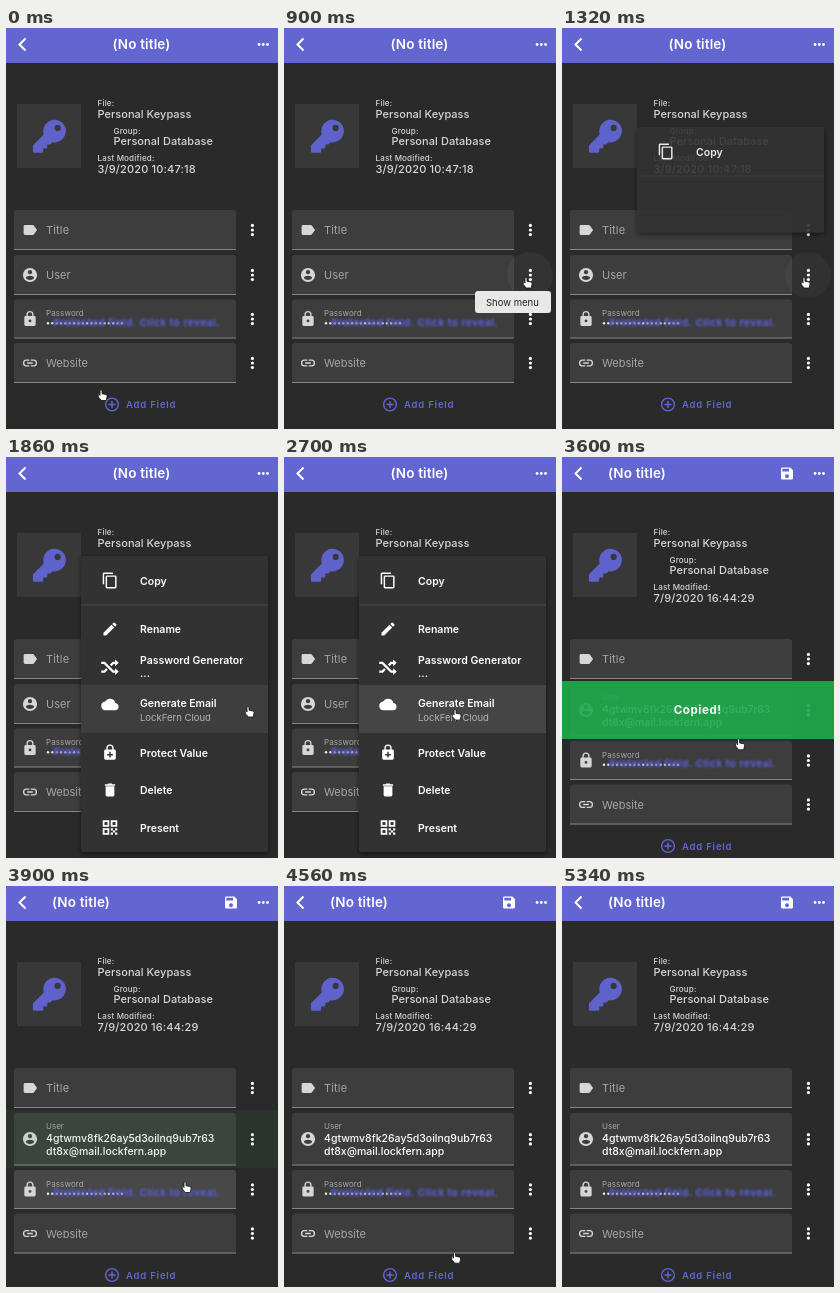
Recreate the animation shown at these times as an HTML page. Size 272 px wide and 401 px high, loop 5400 ms.

```html
<!DOCTYPE html>
<html lang="en">
<head>
<meta charset="utf-8">
<title>Generate email</title>
<style>
  html, body { margin: 0; width: 100%; height: 100%; overflow: hidden; background: #2a2a2a; }
  svg { display: block; width: 272px; height: 401px; font-family: Inter, Roboto, sans-serif; }
  text { white-space: pre; }
</style>
</head>
<body>
<svg id="stage" viewBox="0 0 272 401" width="272" height="401"></svg>
<script>
const LOOP = 5400, STEP = 60, GROW = 12.5;
const BLUE = '#6366d1', LIGHT = '#d6d6d6', GREY = '#a6a6a6';

// 24-unit icon outlines
const ICON = {
  label: 'M17.63 5.84C17.27 5.33 16.67 5 16 5L5 5C3.9 5 3 5.9 3 7v10c0 1.1.9 2 2 2h11c.67 0 1.27-.33 1.63-.84L22 12z',
  user: 'M12 2a10 10 0 1 0 0 20a10 10 0 0 0 0-20zm0 3a3 3 0 1 1 0 6a3 3 0 0 1 0-6zm0 14.2c-2.5 0-4.71-1.28-6-3.22c.03-1.99 4-3.08 6-3.08s5.97 1.09 6 3.08c-1.29 1.94-3.5 3.22-6 3.22z',
  lock: 'M18 8h-1V6A5 5 0 0 0 7 6v2H6a2 2 0 0 0-2 2v10a2 2 0 0 0 2 2h12a2 2 0 0 0 2-2V10a2 2 0 0 0-2-2zM12 17a2 2 0 1 1 0-4a2 2 0 0 1 0 4zm3.1-9H8.9V6a3.1 3.1 0 0 1 6.2 0z',
  link: 'M3.9 12A3.1 3.1 0 0 1 7 8.9h4V7H7a5 5 0 0 0 0 10h4v-1.9H7A3.1 3.1 0 0 1 3.9 12zM8 13h8v-2H8zM17 7h-4v1.9h4a3.1 3.1 0 0 1 0 6.2h-4V17h4a5 5 0 0 0 0-10z',
  copy: 'M16 1H4a2 2 0 0 0-2 2v14h2V3h12zM19 5H8a2 2 0 0 0-2 2v14a2 2 0 0 0 2 2h11a2 2 0 0 0 2-2V7a2 2 0 0 0-2-2zm0 16H8V7h11z',
  edit: 'M3 17.25V21h3.75L17.81 9.94l-3.75-3.75zM20.71 7.04a1 1 0 0 0 0-1.41l-2.34-2.34a1 1 0 0 0-1.41 0l-1.83 1.83l3.75 3.75z',
  shuffle: 'M0 5.5h5l12 12h2v-3l5 4.5l-5 4.5v-3h-3.3L3.7 8.5H0zM0 17.5h3.7l3-3l2.1 2.1L5 20.5H0zM15.7 5.5H19v-3L24 7l-5 4.5v-3h-2l-3 3l-2.1-2.1z',
  cloud: 'M19.35 10.04A7.5 7.5 0 0 0 5.35 8.04A6 6 0 0 0 6 20h13a5 5 0 0 0 .35-9.96z',
  safe: 'M18 8h-1V6A5 5 0 0 0 7 6v2H6a2 2 0 0 0-2 2v10a2 2 0 0 0 2 2h12a2 2 0 0 0 2-2V10a2 2 0 0 0-2-2zM8.9 6a3.1 3.1 0 0 1 6.2 0v2H8.9zM16 16h-3v3h-2v-3H8v-2h3v-3h2v3h3z',
  trash: 'M6 19a2 2 0 0 0 2 2h8a2 2 0 0 0 2-2V7H6zM19 4h-3.5l-1-1h-5l-1 1H5v2h14z',
  blocks: 'M2 2h9v9H2zM4.5 4.5v4h4v-4zM13 2h9v9h-9zM15.5 4.5v4h4v-4zM2 13h9v9H2zM4.5 15.5v4h4v-4zM13 13h3v3h-3zM19 13h3v3h-3zM16 16h3v3h-3zM13 19h3v3h-3zM19 19h3v3h-3z',
  save: 'M17 3H5a2 2 0 0 0-2 2v14a2 2 0 0 0 2 2h14a2 2 0 0 0 2-2V7zM12 19a3 3 0 1 1 0-6a3 3 0 0 1 0 6zm3-10H5V5h10z',
  add: 'M13 7h-2v4H7v2h4v4h2v-4h4v-2h-4zM12 2a10 10 0 1 0 0 20a10 10 0 0 0 0-20zm0 18a8 8 0 1 1 0-16a8 8 0 0 1 0 16z',
  key: 'M24 8.25A8.25 8.25 0 0 1 14.2 16.35L13.1 17.6Q12.7 18 12.2 18H10.5v1.9q0 1.1-1.1 1.1H7.5v1.9Q7.5 24 6.4 24H1.1Q0 24 0 22.9V19.2q0-.5.35-.8L7.9 10.8A8.25 8.25 0 1 1 24 8.25zM18 3.75a2.25 2.25 0 1 0 0 4.5a2.25 2.25 0 0 0 0-4.5z'
};

const rect = (x, y, w, h, fill, more = '') =>
  `<rect x="${x}" y="${y}" width="${w}" height="${h}" fill="${fill}" ${more}/>`;
const icon = (name, cx, cy, size, fill = LIGHT) =>
  `<path transform="translate(${cx - size / 2} ${cy - size / 2}) scale(${size / 24})" fill="${fill}" fill-rule="evenodd" d="${ICON[name]}"/>`;
const text = (x, y, size, str, fill = LIGHT, weight = 400, gap = 0, more = '') =>
  `<text x="${x}" y="${y}" font-size="${size}" fill="${fill}" font-weight="${weight}" letter-spacing="${gap}" ${more}>${str}</text>`;
const group = (id, body, more = '') => `<g id="${id}" ${more}>${body}</g>`;
const dots = (cx, cy, dx, dy, r) => [-1, 0, 1].map(k =>
  `<circle cx="${cx + k * dx}" cy="${cy + k * dy}" r="${r}" fill="#fff"/>`).join('');
const more = cy => dots(246.4, cy, 0, 4.6, 1.6);
const field = (y, h, glow = '') => {
  const shape = `d="M8 ${y + h}V${y + 3}q0-3 3-3H227q3 0 3 3V${y + h}z"`;
  return `<path ${shape} fill="#3d3d3d"/>` +
    (glow && `<path id="${glow}" ${shape} fill="#fff"/>`) +
    rect(8, y + h - 1, 222, 1, '#858585');
};

const header = rect(0, 0, 272, 35, BLUE) +
  '<path d="M19.5 10.5L13.5 16.5L19.5 22.5" fill="none" stroke="#fff" stroke-width="2"/>' +
  text(46, 21, 13.5, '(No title)', '#fff', 600, .15, 'id="title"') +
  group('save', icon('save', 225, 16.5, 16, '#fff')) + dots(257.3, 16.5, 4.2, 0, 1.4);

const info = rect(11, 76, 64, 64, '#383838') + icon('key', 43.4, 108.2, 33, '#5f62cb') +
  text(91.5, 77.5, 8, 'File:', LIGHT, 500, .2) +
  text(91.5, 90, 11, 'Personal Keypass', LIGHT, 500, .03) +
  text(107.5, 105.5, 8, 'Group:', LIGHT, 500, .2) +
  text(107.5, 117, 11, 'Personal Database', LIGHT, 500, .06) +
  text(91.5, 133, 8, 'Last Modified:', LIGHT, 500, .18) +
  text(91.5, 145, 11, '', LIGHT, 500, .16, 'id="date"');

const titleRow = field(182, 40) + icon('label', 24, 202, 17) + text(40, 206, 11, 'Title', GREY, 400, .15) + more(202);
const userEmpty = field(227, 40) + icon('user', 24, 247, 17) + text(40, 251, 11, 'User', GREY) +
  '<circle id="halo" cx="246" cy="247" r="23" fill="#fff"/>' + more(247);
const userFull = field(227, 40 + GROW, 'userGlow') + icon('user', 24, 253, 17) + text(40, 243, 8, 'User', GREY) +
  text(40, 256, 10.5, '4gtwmv8fk26ay5d3oilnq9ub7r63', '#fff', 500) +
  text(40, 268.5, 10.5, 'dt8x@mail.lockfern.app', '#fff', 500) + more(253.3);

let bullets = '';
for (let k = 0; k < 18; k++) bullets += `<circle cx="${42 + k * 4.35}" cy="295.3" r="1.2" fill="#eee"/>`;
const hint = (fill, style) => text(47.5, 297.5, 9.5, 'Protected field. Click to reveal.', fill, 600, .8, style);
const lower = field(271.5, 39, 'passGlow') + icon('lock', 24, 290.8, 17) + text(40, 288, 8, 'Password', GREY, 400, .1) + bullets +
  hint('#4346a0', 'filter="url(#soft)"') + hint('#5f62c4', 'filter="url(#haze)"') + more(291) +
  field(315, 40) + icon('link', 24, 335, 17) + text(40, 339, 11, 'Website', GREY) + more(335) +
  icon('add', 106, 376.5, 17, BLUE) + text(120, 380.3, 9.5, 'Add Field', BLUE, 600, .8);

const tip = rect(191, 263, 76, 22, '#e8e8e8', 'rx="3"') + text(202, 277.5, 9.5, 'Show menu', '#222');

const entry = (name, cy, label, y, extra = '') =>
  icon(name, 104, cy, 17.5, '#fff') + text(134, y, 10.5, label, '#fff', 600) + extra;
const entries = [
  entry('copy', 123.5, 'Copy', 127.5),
  rect(75, 147.5, 187, 1, '#484848'),
  entry('edit', 172, 'Rename', 176),
  entry('shuffle', 209.5, 'Password Generator', 207, text(134, 219.5, 10.5, '...', '#fff', 600)),
  entry('cloud', 247.5, 'Generate Email', 249.5, text(134, 263.5, 9.5, 'LockFern Cloud', '#b4b4b4')),
  entry('safe', 295.5, 'Protect Value', 299.5),
  entry('trash', 333, 'Delete', 337),
  entry('blocks', 370.5, 'Present', 374.5)
];
const menu = rect(75, 99, 187, 296, '#333333', 'id="panel" rx="3" filter="url(#shade)"') +
  '<g clip-path="url(#reveal)">' + rect(75, 228, 187, 48, '#fff', 'id="glow"') +
  entries.map((e, i) => group('entry' + i, e)).join('') + '</g>';

const banner = rect(0, 224, 272, 58, '#1faa4c') +
  text(135.8, 257, 11.5, 'Copied!', '#fff', 700, .6, 'text-anchor="middle"');
const hand = '<path d="M-1 1Q0-.6 1 1V4.2L5 5Q6.3 5.3 6.1 7L5.2 11H.3L-2.7 7.4Q-3-.0 -1 6z" fill="#fff" stroke="#111" stroke-width=".8" stroke-linejoin="round"/>';
const beamPath = 'M-2.4-5Q0-5 0-3Q0-5 2.4-5M0-3V4M-2.4 6Q0 6 0 4Q0 6 2.4 6';
const beam = `<path d="${beamPath}" fill="none" stroke="#fff" stroke-width="2.4"/><path d="${beamPath}" fill="none" stroke="#222" stroke-width="1"/>`;

const $ = id => document.getElementById(id);
$('stage').innerHTML =
  `<defs>
    <filter id="soft"><feGaussianBlur stdDeviation="1.5"/></filter>
    <filter id="haze"><feGaussianBlur stdDeviation=".8"/></filter>
    <filter id="shade" x="-10%" y="-10%" width="120%" height="120%"><feDropShadow dx="0" dy="2" stdDeviation="2.5" flood-opacity=".5"/></filter>
    <clipPath id="reveal"><rect id="window"/></clipPath>
  </defs>` +
  rect(0, 0, 272, 401, '#2a2a2a') + header + info + titleRow +
  group('userEmpty', userEmpty) + group('userFull', userFull) + group('lower', lower) +
  group('tip', tip) + group('menu', menu) + group('banner', banner) +
  group('hand', hand) + group('beam', beam);

const set = (id, attrs) => { for (const k in attrs) $(id).setAttribute(k, attrs[k]); };
const show = (id, on) => set(id, { opacity: +on });
const clamp = v => Math.min(1, Math.max(0, v));
const ramp = (t, a, b) => clamp((t - a) / (b - a));
const ease = v => v * v * (3 - 2 * v);

// pointer stops: time, x, y
const PATH = [[120, 95, 361.5], [750, 242, 249], [2100, 242, 249], [2520, 171, 252],
  [3300, 171, 252], [3780, 179, 295.5], [4320, 179, 295.5], [4740, 165, 412]];

function pointer(t) {
  const i = PATH.findIndex(p => p[0] > t);
  if (i === 0) return PATH[0].slice(1);
  if (i < 0) return PATH[PATH.length - 1].slice(1);
  const [a, x, y] = PATH[i - 1], [b, u, v] = PATH[i], k = ease(ramp(t, a, b));
  return [x + (u - x) * k, y + (v - y) * k];
}

function drawMenu(t) {
  const p = ramp(t, 1230, 1530) * (1 - ramp(t, 2730, 3030));
  const unit = 1 / (entries.length + 1.5);
  const w = 187 * clamp(p / unit), h = 296 * clamp(p / (unit * entries.length));
  const box = { x: 262 - w, y: 99, width: w, height: h };
  set('panel', box);
  set('window', box);
  show('menu', clamp(p * 3));
  entries.forEach((e, i) => show('entry' + i, clamp((p - (i + 1) * unit) / (1.5 * unit))));
  show('glow', .06 * ramp(t, 1560, 1680) + .035 * ramp(t, 2580, 2700));
}

function draw(t) {
  const done = t >= 3060;
  set('title', done ? { x: 46, 'text-anchor': 'start' } : { x: 135.5, 'text-anchor': 'middle' });
  $('date').textContent = done ? '7/9/2020 16:44:29' : '3/9/2020 10:47:18';
  show('save', done);
  show('userEmpty', !done);
  show('userFull', done);
  set('lower', { transform: `translate(0 ${done ? GROW : 0})` });
  show('halo', .045 * ramp(t, 690, 780) * (1 - ramp(t, 1260, 1440)));
  show('tip', ramp(t, 720, 840) * (1 - ramp(t, 1200, 1290)));
  drawMenu(t);
  show('banner', .91 * ramp(t, 3030, 3180) * (1 - ramp(t, 3640, 3925)));

  const [x, y] = pointer(t), typing = done && y < 280;
  const at = { transform: `translate(${x} ${y})` };
  set('hand', at);
  set('beam', at);
  show('hand', !typing && t < 4740);
  show('beam', typing);
  show('userGlow', typing * .06);
  show('passGlow', (done && y > 284 && y < 323) * .06);
}

const start = performance.now();
function tick() {
  const t = (performance.now() - start) % LOOP;
  draw(Math.floor(t / STEP) * STEP);
  requestAnimationFrame(tick);
}
tick();
</script>
</body>
</html>
```
